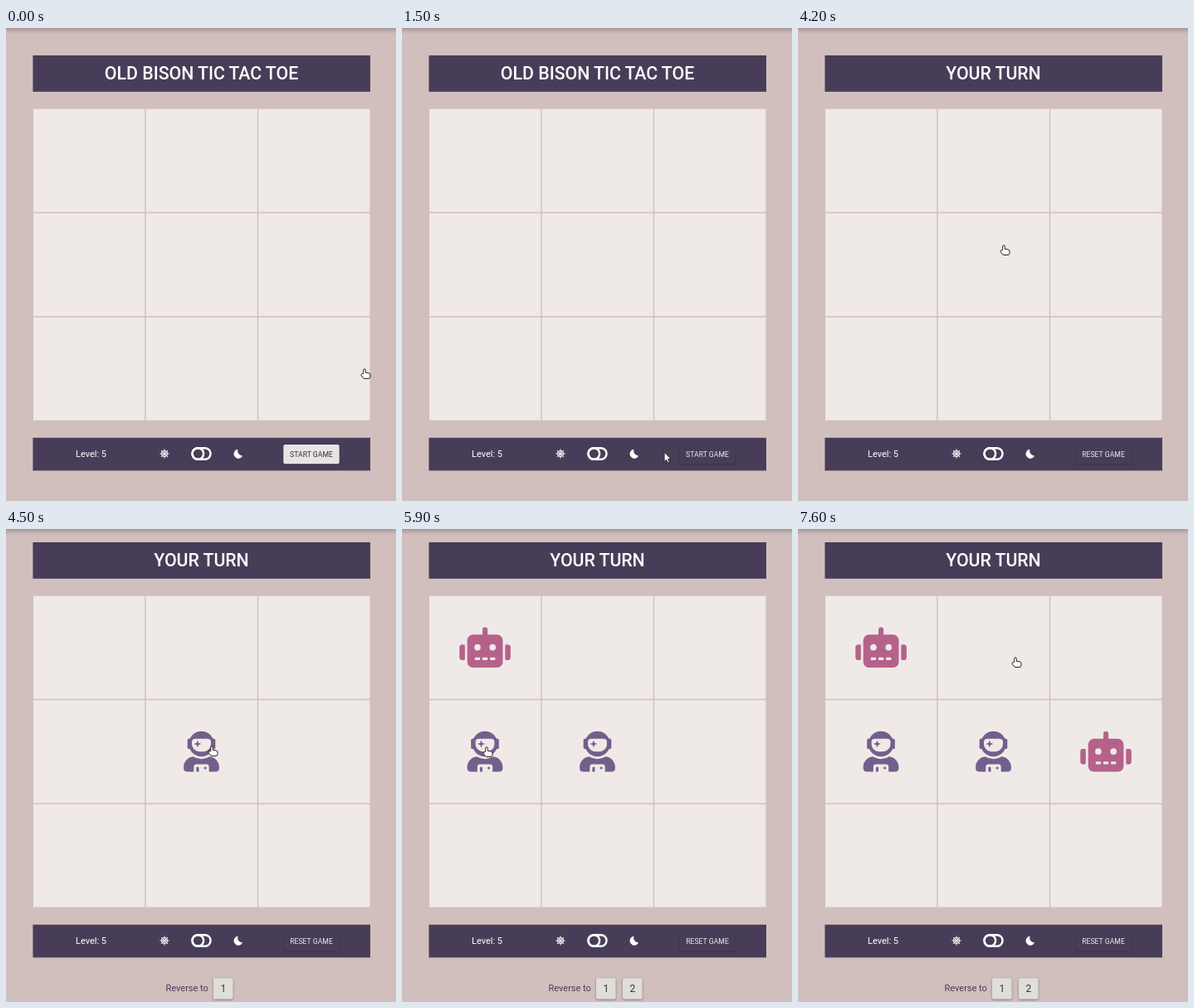
Recreate the animation shown at these times as an HTML page. Size 470 by 570 pixels, loop 8 s.

```html
<!DOCTYPE html>
<html lang="en">
<head>
<meta charset="utf-8">
<title>Tic tac toe</title>
<style>
  html, body { margin: 0; width: 100%; height: 100%; overflow: hidden; background: #d1bfbd; }
  svg { display: block; width: 470px; height: 570px; font: 11px Roboto, sans-serif; }
  .bar { fill: #483d58; }
  .title { font-size: 21.3px; font-weight: 500; fill: #fff; text-anchor: middle; }
  .label { font-size: 8.7px; text-anchor: middle; }
  .raised { filter: drop-shadow(0 1.5px 1.5px rgba(0, 0, 0, .35)); }
  .num { fill: #333; text-anchor: middle; font-size: 12px; }
  .white-line { fill: none; stroke: #fff; }
  .pointer { fill: #fff; stroke: #222; stroke-linejoin: round; }
</style>
</head>
<body>
<svg viewBox="0 0 470 570">
  <defs>
    <linearGradient id="shade" x2="0" y2="1">
      <stop offset="0" stop-color="#5d5052" stop-opacity=".35"/>
      <stop offset="1" stop-color="#5d5052" stop-opacity="0"/>
    </linearGradient>
    <g id="robot" fill="#b5628a">
      <rect y="224" width="92" height="192" rx="32"/>
      <rect x="548" y="224" width="92" height="192" rx="32"/>
      <rect x="64" y="224" width="512" height="192" fill="#efeae7"/>
      <rect width="64" height="192" x="0" y="224" rx="30"/>
      <rect width="64" height="192" x="576" y="224" rx="30"/>
      <rect x="288" width="64" height="140" rx="32"/>
      <rect x="96" y="96" width="448" height="416" rx="72"/>
      <g fill="#efeae7">
        <circle cx="224" cy="256" r="40"/><circle cx="416" cy="256" r="40"/>
        <path d="M192 384h64v32h-64zM288 384h64v32h-64zM384 384h64v32h-64z"/>
      </g>
    </g>
    <g id="astronaut" fill="#735f8b">
      <circle cx="224" cy="160" r="160"/>
      <rect x="48" y="96" width="352" height="128" rx="16"/>
      <path fill="#efeae7" d="M104 136q0-40 48-40h144q48 0 48 40v24c0 53-43 96-96 96h-48c-53 0-96-43-96-96z"/>
      <path d="M176 208l12-36 36-12-36-12-12-36-12 36-36 12 36 12z"/>
      <path d="M120 321Q224 383 328 321C395 328 448 385 448 454v10q0 48-48 48h-80v-64q0-32-32-32H160q-32 0-32 32v64H48q-48 0-48-48v-10C0 385 53 328 120 321z"/>
      <circle cx="272" cy="464" r="16"/>
      <path d="M160 512v-48a16 16 0 0 1 32 0v48z"/>
    </g>
  </defs>

  <rect width="470" height="570" fill="#d1bfbd"/>

  <g id="page">
    <rect class="bar" x="32.4" y="33" width="406.6" height="43.8"/>
    <text class="title" id="title" x="235.5" y="62"></text>
    <g id="board"></g>

    <rect class="bar" x="32.4" y="493.8" width="406.6" height="39.6"/>
    <text x="84" y="517" fill="#fff">Level: 5</text>
    <g id="sun" class="white-line" transform="translate(191 513)">
      <circle r="3.6"/>
    </g>
    <g class="white-line" stroke-width="2.5">
      <rect x="224.5" y="506.2" width="22" height="13.6" rx="6.8"/>
      <circle cx="231.3" cy="513" r="6.8"/>
    </g>
    <path fill="#fff" d="M279.4 507.7A5.5 5.5 0 1 0 285 515.6A6.2 6.2 0 0 1 279.4 507.7z"/>
    <g id="button">
      <rect x="334.3" y="502" width="67.4" height="23.2" rx="2"/>
      <text class="label" x="368" y="517"></text>
    </g>
    <g id="reverse"></g>
  </g>

  <rect width="470" height="7" fill="url(#shade)"/>

  <g id="cursor">
    <path id="hand" class="pointer" d="M-1.3 5.6V1.2a1.3 1.3 0 0 1 2.6 0V4.3L5 4.8q2 .3 2 2.2V9q0 2.5-2 2.5H0q-1 0-1.6-.8L-3.9 7.6q-.4-1.9 1.2-1.7z"/>
    <path id="arrow" class="pointer" stroke-width=".8" d="M0 0V11.2L2.5 9 4.3 12.8 6.1 12 4.4 8.3H7.8z"/>
  </g>
</svg>
<script>
const LOOP = 8000, STEP = 100;
const START = 3300, FIRST_MOVE = 4400, SECOND_MOVE = 5900;
const SHIFT = 17;
const NS = 'http://www.w3.org/2000/svg';
const $ = id => document.getElementById(id);

function add(parent, tag, attrs, text = '') {
  const node = document.createElementNS(NS, tag);
  for (const key in attrs) node.setAttribute(key, attrs[key]);
  node.textContent = text;
  parent.append(node);
  return node;
}

// Board
for (let i = 0; i < 9; i++) {
  add($('board'), 'rect', {
    x: 33 + i % 3 * 135.6, y: 97.7 + Math.floor(i / 3) * 125.5,
    width: 134.2, height: 124, fill: '#efeae7'
  });
}

function addPiece(kind, col, row, from) {
  const x = 100 + col * 135.5 - (kind === 'robot' ? 30.5 : 21.4);
  const y = 135.2 + row * 125.5;
  const node = add($('board'), 'use', { href: '#' + kind, transform: `translate(${x} ${y}) scale(.0955)` });
  return { node, from };
}

const pieces = [
  addPiece('astronaut', 1, 1, FIRST_MOVE),
  addPiece('robot', 0, 0, FIRST_MOVE + 300),
  addPiece('astronaut', 0, 1, SECOND_MOVE),
  addPiece('robot', 2, 1, SECOND_MOVE + 200)
];

// Sun rays
for (let i = 0; i < 8; i++) {
  add($('sun'), 'path', { d: 'M0 0V-5.6', transform: `rotate(${i * 45})` });
}

// "Reverse to" rows, one per number of moves
const reverseRows = [1, 2].map(count => {
  const row = add($('reverse'), 'g', {});
  const left = 208.5 - count * 16;
  add(row, 'text', { x: left, y: 573.5, fill: '#483d58' }, 'Reverse to');
  for (let i = 0; i < count; i++) {
    const x = left + 57.5 + i * 32;
    add(row, 'rect', { class: 'raised', x, y: 558.3, width: 23.5, height: 25.2, rx: 2, fill: '#dfded9' });
    add(row, 'text', { class: 'num', x: x + 11.8, y: 575 }, i + 1);
  }
  return row;
});

// Each pointer move eases to its goal and swings out sideways on the way
const home = [432, 411];
const moves = [
  { from: 0, to: 800, goal: [356, 499], swing: [-265, -300] },
  { from: 800, to: 1700, goal: [356, 513], swing: [-62, 0] },
  { from: 3600, to: 4200, goal: [248, 262], swing: [-230, -260] },
  { from: 4700, to: 5400, goal: [252, 260], swing: [170, 60] },
  { from: 5400, to: 5800, goal: [102, 263], swing: [0, 0] },
  { from: 6000, to: 6300, goal: [252, 427], swing: [0, 0] },
  { from: 6500, to: 7600, goal: [262, 155], swing: [165, 0] }
];

function pointerAt(t) {
  let pos = home;
  for (const { from, to, goal, swing } of moves) {
    if (t < from) break;
    const k = Math.min(1, (t - from) / (to - from));
    const ease = k * k * (3 - 2 * k), out = Math.sin(Math.PI * k);
    pos = pos.map((p, i) => p + (goal[i] - p) * ease + swing[i] * out);
  }
  return pos;
}

const inside = (x, y, l, t, r, b) => x >= l && x <= r && y >= t && y <= b;
const show = (node, on) => node.setAttribute('visibility', on ? 'visible' : 'hidden');
const mix = (a, b, k) => `rgb(${a.map((v, i) => Math.round(v + (b[i] - v) * k))})`;

function drawButton(t, hover) {
  const [box, label] = $('button').children;
  const light = hover ? 1 : Math.max(0, 1 - t / 300);
  box.setAttribute('fill', mix([72, 61, 88], [231, 228, 227], light));
  label.setAttribute('fill', mix([236, 232, 236], [51, 51, 51], light));
  label.textContent = t < START ? 'START GAME' : 'RESET GAME';
  box.style.filter = `drop-shadow(0 1px ${hover ? 2.5 : 1.2}px rgba(0, 0, 0, ${hover ? .5 : .22}))`;
}

function render(time) {
  const t = Math.floor(time % LOOP / STEP) * STEP;
  const shift = t < FIRST_MOVE ? 0 : SHIFT;
  const [x, y] = pointerAt(t);
  const hover = inside(x, y + shift, 334, 502, 402, 525);
  const onBoard = inside(x, y + shift, 33, 97, 438, 473);

  $('page').setAttribute('transform', `translate(0 ${-shift})`);
  $('title').textContent = t < START ? 'OLD BISON TIC TAC TOE' : 'YOUR TURN';
  pieces.forEach(p => show(p.node, t >= p.from));
  show(reverseRows[0], t >= FIRST_MOVE && t < SECOND_MOVE);
  show(reverseRows[1], t >= SECOND_MOVE);
  drawButton(t, hover);

  $('cursor').setAttribute('transform', `translate(${x} ${y})`);
  show($('hand'), hover || onBoard);
  show($('arrow'), !hover && !onBoard);
}

const begin = performance.now();
function tick() {
  render(performance.now() - begin);
  requestAnimationFrame(tick);
}
tick();
</script>
</body>
</html>
```
